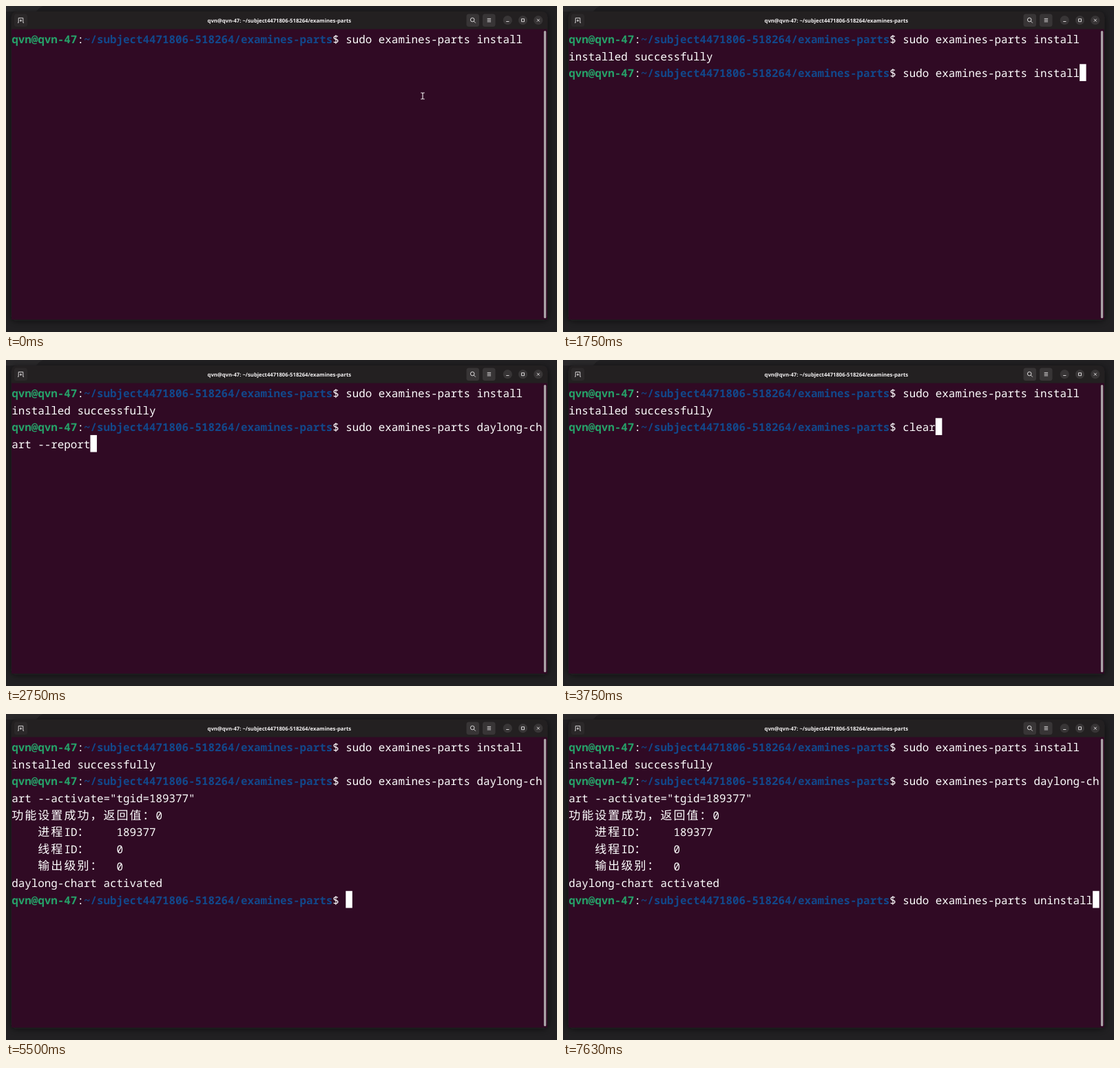
Write an HTML page that moves like this. It is 800 px wide and 473 px high and loops after 8 s.

```html
<!DOCTYPE html>
<html lang="en">
<head>
<meta charset="utf-8">
<title>Terminal session</title>
<style>
  html, body { margin: 0; width: 100%; height: 100%; overflow: hidden; background: #1f1e20; }
  svg { display: block; width: 100vw; height: 100vh; }
  text { white-space: pre; text-rendering: geometricPrecision; }
  #screen { font: 15.85px "Noto Sans Mono", "DejaVu Sans Mono", monospace; fill: #fff; }
  #screen .user { fill: #26a269; font-weight: 700; }
  #screen .path { fill: #12488b; font-weight: 700; }
  #screen .wide { font: 17px "Noto Sans CJK SC", "Noto Sans CJK", sans-serif; }
  #title { font: 700 7.7px "Open Sans", "Noto Sans", sans-serif; fill: #f4f2f3; text-anchor: middle; }
  .icon { fill: none; stroke: #e8e6e7; stroke-width: .9; }
</style>
</head>
<body>
<svg viewBox="0 0 800 473" preserveAspectRatio="none">
  <defs>
    <filter id="blur" x="-10%" y="-10%" width="120%" height="120%"><feGaussianBlur stdDeviation="5"/></filter>
  </defs>
  <rect width="800" height="473" fill="#212022"/>
  <path d="M0 0H54Q48 2 44 8H0Z" fill="#2a292b"/>
  <rect x="7" y="10" width="780" height="447" rx="8" fill="#0c0b0d" opacity=".6" filter="url(#blur)"/>
  <path d="M8 34V16Q8 8 16 8H778Q786 8 786 16V34Z" fill="#232021"/>
  <rect x="8" y="33.5" width="778" height="421.5" fill="#300a24"/>
  <rect x="780.9" y="36" width="3.3" height="417" rx="1.6" fill="#aaa3a7"/>

  <text id="title" x="396.8" y="23.6"></text>

  <g fill="#383536">
    <rect x="12" y="11.5" width="19" height="18.5" rx="3.5" fill="#2b2829"/>
    <rect x="668.5" y="11.5" width="18.5" height="18.5" rx="3.5"/>
    <rect x="692" y="11.5" width="18.5" height="18.5" rx="3.5"/>
    <circle cx="728.3" cy="20.7" r="6.6"/>
    <circle cx="750.5" cy="20.7" r="6.6"/>
    <circle cx="772.8" cy="20.7" r="6.6"/>
  </g>
  <g class="icon">
    <path d="M17 24.2H18.2V17.4H24.8V24.2H26M21.5 19.4V22.8M19.8 21.1H23.2"/>
    <circle cx="677.2" cy="20" r="2.8"/>
    <path d="M679.3 22.1L681.8 24.6M698.7 18.4H704.1M698.7 20.6H704.1M698.7 22.8H704.1"/>
    <path d="M726.2 22.5H730.4M748.5 18.7H752.5V22.7H748.5ZM770.9 18.8L774.7 22.6M774.7 18.8L770.9 22.6"/>
  </g>

  <g id="screen"></g>
  <path id="pointer" d="M602.2 126H604.2L605 126.8L605.8 126H607.8M605 126.8V134.2M602.2 135H604.2L605 134.2L605.8 135H607.8"
    fill="none" stroke="#e2dce0" stroke-width="1.2"/>
</svg>
<script>
const LOOP = 8000, COLS = 81, CELL = 9.51, ROW = 24.64, LEFT = 8.3, TOP = 35;
const USER = 'qvn@qvn-47', PATH = '~/subject4471806-518264/examines-parts';
const screen = document.getElementById('screen');
const pointer = document.getElementById('pointer');
document.getElementById('title').textContent = USER + ': ' + PATH;

const tool = args => '$ sudo examines-parts ' + args;
const prompt = '$ ', clear = '$ clear';
const install = tool('install'), uninstall = tool('uninstall');
const report = tool('daylong-chart --report');
const activate = tool('daylong-chart --activate="tgid=189377"');
const ready = [install, 'installed successfully'];
const active = [...ready, activate,
  '功能设置成功，返回值：0',
  '    进程ID：    189377',
  '    线程ID：    0',
  '    输出级别：  0',
  'daylong-chart activated'];

// [start ms, lines, cursor shown]
const steps = [
  [0, [install], false],
  [250, [install], true],
  [750, [install, ''], true],
  [1250, [...ready, prompt], true],
  [1750, [...ready, install], true],
  [2000, [...ready, clear], true],
  [2250, [...ready, uninstall], true],
  [2750, [...ready, report], true],
  [3380, [...ready, report], false],
  [3750, [...ready, clear], true],
  [4000, [...ready, uninstall], true],
  [4130, [...ready, report], true],
  [4250, [...ready, activate], true],
  [4880, [...ready, activate], false],
  [5500, [...active, prompt], true],
  [6000, [...active, prompt], false],
  [6250, [...active, activate], true],
  [6630, [...active, install], true],
  [7000, [...active, clear], true],
  [7630, [...active, uninstall], true]
];

function add(tag, attrs, content = '') {
  const el = document.createElementNS('http://www.w3.org/2000/svg', tag);
  for (const name in attrs) el.setAttribute(name, attrs[name]);
  el.textContent = content;
  screen.appendChild(el);
}

const cellX = col => LEFT + col * CELL;
const cellY = row => TOP + row * ROW;
const isWide = ch => ch > '\u2fff';

function spans(line) {
  return line.startsWith('$')
    ? [['user', USER], ['', ':'], ['path', PATH], ['', line]]
    : [['', line]];
}

function drawScreen(lines, cursor) {
  screen.replaceChildren();
  let row = -1, col = 0;
  for (const line of lines) {
    row++;
    col = 0;
    for (const [style, str] of spans(line)) {
      let word = '', start = 0;
      const flush = () => {
        if (word) add('text', { x: cellX(start), y: cellY(row) + 19.2, class: style }, word);
        word = '';
      };
      for (const ch of str) {
        if (col >= COLS) {
          flush();
          row++;
          col = 0;
        }
        if (isWide(ch)) {
          flush();
          add('text', { x: cellX(col), y: cellY(row) + 19, class: 'wide' }, ch);
          col += 2;
          continue;
        }
        if (ch === ' ') flush();
        else {
          if (!word) start = col;
          word += ch;
        }
        col++;
      }
      flush();
    }
  }
  if (cursor) add('rect', { x: cellX(col), y: cellY(row), width: CELL, height: ROW });
}

let shown = null;
function render(ms) {
  const step = steps.findLast(s => s[0] <= ms);
  if (step === shown) return;
  shown = step;
  drawScreen(step[1], step[2]);
  pointer.style.display = step[0] < 750 ? '' : 'none';
}

function tick() {
  render(performance.now() % LOOP);
  requestAnimationFrame(tick);
}
tick();
</script>
</body>
</html>
```
